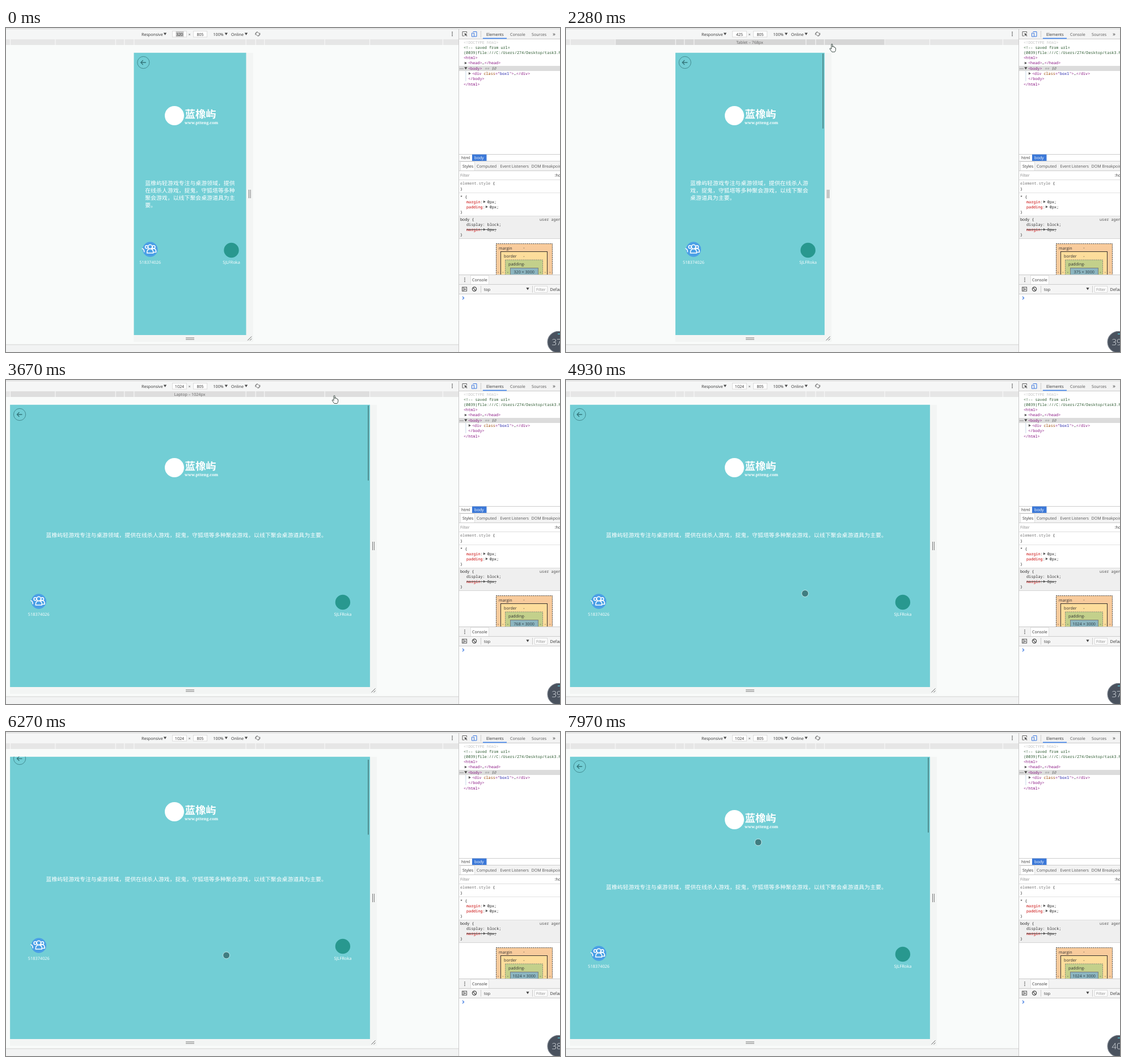
An HTML page that plays this animation: 977x573 px, repeating every 8000 ms.

```html
<!DOCTYPE html>
<html lang="zh-CN">
<head>
<meta charset="utf-8">
<title>Responsive preview</title>
<style>
html, body { margin: 0; width: 100%; height: 100%; overflow: hidden; background: #f9fbfa; }
svg { display: block; }
text { font: 7.15px "Open Sans", "Noto Sans", sans-serif; fill: #333; white-space: pre; text-rendering: geometricPrecision; }
.m { font: 6.82px "Noto Sans Mono", "DejaVu Sans Mono", monospace; }
.zh { font-family: "Noto Sans CJK SC", "Noto Sans CJK", sans-serif; }
</style>
</head>
<body>
<svg id="stage" width="977" height="573" viewBox="0 0 977 573"></svg>
<script>
const NS = 'http://www.w3.org/2000/svg';
const stage = document.getElementById('stage');
const LOOP = 8000, SCALE = 0.62, MID = 324.5, TOP = 44, BOTTOM = 543;

function el(tag, attrs, parent = stage) {
  const n = document.createElementNS(NS, tag);
  set(n, attrs);
  parent.appendChild(n);
  return n;
}
function set(n, attrs) { for (const k in attrs) n.setAttribute(k, attrs[k]); }
function rect(x, y, width, height, fill, parent, more) {
  return el('rect', { x, y, width, height, fill, ...more }, parent);
}
function path(d, stroke, parent, more) {
  return el('path', { d, stroke, fill: 'none', ...more }, parent);
}
function text(x, y, str, fill = '#333', parent, more) {
  const n = el('text', { x, y, style: 'fill:' + fill, ...more }, parent);
  n.textContent = str;
  return n;
}
function code(x, y, parts) {
  const n = el('text', { x, y, class: 'm' });
  for (let i = 0; i < parts.length; i += 2) {
    const s = el('tspan', { style: 'fill:' + parts[i + 1] }, n);
    s.textContent = parts[i];
  }
}
const down = (x, y, fill = '#444') => path(`M${x - 2.6} ${y - 2}h5.2l-2.6 4.4z`, 'none', stage, { fill });
const right = (x, y) => path(`M${x - 1.6} ${y - 2.3}v4.6l4-2.3z`, 'none', stage, { fill: '#555' });
const hline = (x, y, w, c = '#ccc') => rect(x, y, w, 1, c);
const dots = (x, y) => [-3, 0, 3].forEach(d => el('circle', { cx: x, cy: y + d, r: 0.9, fill: '#555' }));

// Device toolbar
rect(0, 0, 977, 573, '#f9fbfa');
rect(0, 0, 798, 20, '#f5f6f6');
hline(0, 1, 977, '#d0d0d0');
text(239, 13.6, 'Responsive');
down(280.5, 10.4);
rect(293.5, 5.5, 25, 10.5, '#fff', stage, { stroke: '#dcdcdc' });
const selection = rect(299.5, 6, 14, 9.5, '#c6c6c6');
const widthText = text(306, 13.6, '320', '#333', stage, { 'text-anchor': 'middle' });
text(321.5, 13.8, '×', '#555');
rect(330.5, 5.5, 24, 10.5, '#fff', stage, { stroke: '#dcdcdc' });
text(342.5, 13.6, '805', '#333', stage, { 'text-anchor': 'middle' });
text(365.5, 13.6, '100%');
down(388.3, 10.4);
text(397, 13.6, 'Online');
down(423.5, 10.4);
el('rect', { x: 441.3, y: 7.8, width: 5, height: 5.6, rx: 1, transform: 'rotate(-45 443.8 10.6)', fill: 'none', stroke: '#555', 'stroke-width': 0.8 });
path('M440.2 12.5a4 4 0 0 1 3-5.7M447.5 8.6a4 4 0 0 1-3 5.8', '#555', stage, { 'stroke-width': 0.8 });
dots(787, 10.5);

// Preset bars
const presets = [
  { name: 'Mobile S', px: 320, tone: '#d4d4d4', breaks: [16, 16, 16] },
  { name: 'Mobile M', px: 375, tone: '#d2d2d2', breaks: [18, 17] },
  { name: 'Mobile L', px: 425, tone: '#d4d4d4', breaks: [21, 21] },
  { name: 'Tablet', px: 768, tone: '#d6d6d6', breaks: [38] },
  { name: 'Laptop', px: 1024, tone: '#dedede', breaks: [] },
  { name: 'Laptop L', px: 1440, tone: '#dedede', breaks: [] }
];
rect(0, 20, 798, 10, '#e6e6e6');
const hoverBar = rect(0, 20, 0, 10, '#d2d2d2');
for (const p of presets) {
  const half = p.px * SCALE / 2;
  rect(MID - half, 20, 1, 10, '#fafafa');
  rect(MID + half - 1, 20, 1, 10, '#fafafa');
}
const label = text(MID - 0.5, 28.2, '', '#666', stage, { 'text-anchor': 'middle' });

// Resize handles
const handles = el('g', {});
const shadeSide = rect(0, TOP, 12, 511, '#f3f5f4', handles);
const shadeBase = rect(0, BOTTOM, 0, 12, '#f3f5f4', handles);
path('M317 548h15M317 550.8h15', '#777', handles);
const grips = el('g', {}, handles);
path('M4.6 286v15M7.4 286v15', '#777', grips);
path('M2.5 552.5l7-7M6.5 552.5l3-3', '#666', grips);

// Previewed page
const view = el('svg', { y: TOP - 0.4, height: BOTTOM - TOP + 0.4 });
const back = rect(0, 0, 977, 573, '#72ced5', view);
const page = el('g', {}, view);
const arrow = el('g', { transform: 'translate(17 61)' }, page);
el('circle', { r: 10.6, fill: 'none', stroke: '#3f858b', 'stroke-width': 0.9 }, arrow);
path('M4.5 0h-9M-0.6-4l-4 4 4 4', '#34757b', arrow, { 'stroke-width': 1.3 });

const logo = el('g', {}, page);
el('circle', { cx: -27.5, cy: 155, r: 17, fill: '#fff' }, logo);
text(-9, 159, '蓝橡屿', '#fff', logo, { class: 'zh', 'font-weight': 700, style: 'fill:#fff;font-size:18.4px;font-weight:700' });
text(-9.5, 170.2, 'www.ptteng.com', '#fff', logo, { style: 'fill:#fff;font:600 7px "Noto Serif",serif' });

const intro = '蓝橡屿轻游戏专注与桌游领域，提供在线杀人游戏，捉鬼，守狐塔等多种聚会游戏，以线下聚会桌游道具为主要。';
const rows = [0, 1, 2, 3].map(i =>
  text(0, 277.7 + i * 13, '', '#fff', page, { class: 'zh', style: 'fill:#fff;font-size:9.92px' }));

const group = el('g', {}, page);
el('circle', { cy: 391.5, r: 13.2, fill: '#4a9fe6' }, group);
const person = { fill: '#4a9fe6', 'stroke-width': 1.5, 'stroke-linejoin': 'round' };
for (const s of [-1, 1]) {
  path(`M${s * 10.5} 396.5q0-6-4-6.5h-${s < 0 ? -3 : 3}v6.5z`, '#fff', group, person);
  el('circle', { cx: s * 6.2, cy: 387.3, r: 2.5, stroke: '#fff', ...person }, group);
}
path('M-5.6 398q0-7.5 5.6-7.5t5.6 7.5z', '#fff', group, person);
el('circle', { cy: 386.8, r: 3.6, stroke: '#fff', ...person }, group);
const caption = { 'text-anchor': 'middle' };
text(0, 417, '518374026', '#fff', group, { ...caption, style: 'fill:#fff;font-size:7.4px' });

const account = el('g', {}, page);
el('circle', { cy: 393, r: 13.2, fill: '#28988f' }, account);
text(0, 417, 'SJLFRoka', '#fff', account, { ...caption, style: 'fill:#fff;font-size:7.4px' });
const thumb = rect(0, 0, 2, 133, '#4f8d8f', view, { rx: 1 });

// Developer panel
rect(0, 560, 798, 13, '#f2f3f3');
hline(0, 559.5, 798, '#d4d4d4');
rect(798, 2, 179, 571, '#fff');
rect(798, 2, 179, 17.5, '#f3f3f3');
hline(798, 19, 179);
path('M812.5 9V6.5h-7.5v7.5h3', '#555', stage, { 'stroke-width': 0.9 });
path('M808.5 9l5 2-2 .8 2 2.2-1 .8-1.9-2.2-1.2 1.8z', 'none', stage, { fill: '#555' });
path('M823.5 6.5h6.5v8.5h-4M821.5 9h4v6.2h-4z', '#3b78e0', stage, { 'stroke-width': 1 });
rect(837, 5, 1, 12, '#ccc');
text(847, 13.7, 'Elements');
rect(841, 17.5, 42, 1.7, '#4a8cf0');
text(889, 13.7, 'Console', '#555');
text(927, 13.7, 'Sources', '#555');
text(964, 13.5, '»', '#444', stage, { style: 'fill:#444;font-size:10px' });

const TAG = '#881280', ATTR = '#994500', VAL = '#1a1aa6', RED = '#c80000', INK = '#222', NOTE = '#2c5a30';
rect(798, 67, 179, 9, '#dcdcdc');
rect(810.5, 76, 0.8, 18, '#b9d2e4');
code(807, 27.6, ['<!DOCTYPE html>', '#c0c0c0']);
code(807, 37, ['<!-- saved from url=', NOTE]);
code(807, 46.2, ['(0039)file:///C:/Users/274/Desktop/task3.html', NOTE]);
code(807, 55.2, ['<html>', TAG]);
code(815, 64.4, ['<head>', TAG, '…', INK, '</head>', TAG]);
code(815, 73.7, ['<body>', TAG]);
text(844, 73.7, '== $0', '#777', stage, { class: 'm', 'font-style': 'italic', style: 'fill:#777;font-style:italic' });
code(822, 82.9, ['<div', TAG, ' class', ATTR, '="', TAG, 'box1', VAL, '">', TAG, '…', INK, '</div>', TAG]);
code(815, 92.3, ['</body>', TAG]);
code(807, 101.5, ['</html>', TAG]);
right(810.5, 62);
down(810.8, 71.2);
right(817.5, 80.4);
[801, 803.4, 805.8].forEach(cx => el('circle', { cx, cy: 72, r: 0.8, fill: '#777' }));

hline(798, 223, 179);
text(803, 232.4, 'html');
rect(822, 223.6, 25.5, 12, '#3b78d8');
text(826, 232.4, 'body', '#fff');
rect(798, 235.5, 179, 17, '#f3f3f3');
hline(798, 235, 179);
rect(801.5, 236.5, 25, 16, '#fff', stage, { stroke: '#d6d6d6', 'stroke-width': 0.7 });
hline(798, 252, 179);
text(805, 247.3, 'Styles');
text(830, 247.3, 'Computed', '#555');
text(871.5, 247.3, 'Event Listeners', '#555');
text(926.5, 247.3, 'DOM Breakpoints', '#555');
text(801, 263.3, 'Filter', '#888');
text(967.5, 263.3, ':hov', '#333');
hline(798, 268, 179, '#ddd');
code(801, 276.8, ['element.style ', '#777', '{', INK]);
code(801, 287.3, ['}', INK]);
hline(798, 291, 179, '#e2e2e2');
code(801, 300.5, ['* {', INK]);
code(812, 309.6, ['margin', RED, ':', INK]);
right(843.5, 307.2);
code(848.8, 309.6, ['0px;', INK]);
code(812, 318.7, ['padding', RED, ':', INK]);
right(847.5, 316.3);
code(852.8, 318.7, ['0px;', INK]);
code(801, 327.6, ['}', INK]);
rect(798, 332, 179, 40, '#efefef');
hline(798, 332, 179, '#ddd');
code(801, 340.5, ['body {', INK]);
code(941, 340.5, ['user agent stylesheet', '#555']);
code(812, 350, ['display: block;', '#333']);
code(812, 358.9, ['margin', RED, ':', INK]);
right(843.5, 356.4);
code(848.8, 358.9, ['8px;', INK]);
hline(812, 356, 53, '#555');
code(801, 367.8, ['}', INK]);
hline(798, 372, 179, '#d4d4d4');

// Box model
const box = (x, y, w, fill, stroke, dash) => rect(x, y, w, 80, fill, stage, { stroke, 'stroke-width': 0.9, 'stroke-dasharray': dash });
box(864.5, 381.5, 99, '#f8cb9c', '#222', '2 1.4');
box(872.5, 395.5, 82, '#fddd9b', '#222', 'none');
box(880.5, 410, 66, '#c3d08b', '#777', '2 1.4');
box(889.5, 424.5, 49, '#8cb5c0', '#777', 'none');
text(869, 391.6, 'margin');
text(878, 405.8, 'border');
text(886, 420, 'padding');
[[913.5, 391.2], [913.5, 405.5], [914, 419.6]].forEach(p => text(...p, '-', INK, stage, caption));
[868, 876.5, 885, 942.5, 951, 959.5].forEach(x => text(x, 434, '-', INK, stage, caption));
const boxText = text(913.7, 434.4, '', '#2d3d44', stage, caption);

// Console drawer
rect(798, 436.5, 179, 17, '#f3f3f3');
hline(798, 436, 179);
dots(809, 445.3);
rect(819.5, 437.5, 32, 16, '#fff', stage, { stroke: '#d6d6d6', 'stroke-width': 0.7 });
text(822, 448.3, 'Console');
rect(798, 453.5, 179, 17, '#f5f5f5');
hline(798, 453, 179);
rect(798, 470.5, 179, 103, '#fff');
hline(798, 470, 179);
rect(804.5, 458.3, 8, 7, 'none', stage, { stroke: '#555' });
path('M806.8 458v7.5', '#555');
path('M808.4 460v3.8l3-1.9z', 'none', stage, { fill: '#555' });
el('circle', { cx: 826, cy: 461.8, r: 3.6, fill: 'none', stroke: '#444', 'stroke-width': 1.2 });
path('M823.5 459.3l5 5', '#444', stage, { 'stroke-width': 1.2 });
rect(837, 456, 1, 12, '#ccc');
text(843, 464.7, 'top');
down(920, 461.2);
rect(928, 456, 1, 12, '#ccc');
rect(932.5, 456.5, 22, 11, '#fff', stage, { stroke: '#dadada' });
text(935, 464.7, 'Filter', '#888');
text(959.5, 464.7, 'Default levels');
path('M805 475l2.6 2.5-2.6 2.5', '#3b78e0', stage, { 'stroke-width': 1.2 });
rect(798, 2, 1, 571, '#c8c8c8');

// Load badge
el('circle', { cx: 974, cy: 555.5, r: 19, fill: '#4a525e', stroke: '#868d96', 'stroke-width': 1.2 });
path('M973 541.2q3-.5 6 .4', '#58c4d6', stage, { 'stroke-width': 1.4 });
const badge = text(962.5, 561, '', '#e8ecef', stage, { style: 'fill:#e8ecef;font-size:15px;font-weight:300' });

// Pointers
const touch = el('g', {});
el('circle', { r: 6, fill: '#3f7d81', stroke: '#c4e8ea', 'stroke-width': 1 }, touch);
const hand = path('M-1 1.2q1-2 2 0v4.6l.2-1.2q1.3-.7 1.9.3v.8q1.4-.6 1.8.5v.8q1.5-.4 1.7.7v3.2q-.3 2.2-1.6 3.6h-5q-2.2-2.6-3.8-5.4 0-1.4 1.4-1l1.4 1.3z', '#2b3b35', stage, { fill: '#fff', 'stroke-width': 0.9 });
const pointer = path('M0 0v10.5l2.5-2.3 1.7 3.8 1.6-.7-1.6-3.7h3.3z', '#222', stage, { fill: '#fff', 'stroke-width': 0.8 });

// Timeline
const cursorKeys = [
  [110, 390, 300], [390, 408, 203], [550, 410, 200], [900, 425, 50], [1200, 425.5, 27],
  [1500, 425.5, 27], [1900, 447, 27], [2150, 447, 27], [2400, 488, 28.5], [2590, 489, 29.5],
  [2700, 489, 29.5], [3250, 579, 27], [3700, 579, 27], [4200, 520, 160], [4470, 480, 260],
  [5170, 400, 421], [5330, 398, 421], [5630, 398, 407], [5950, 394, 350], [6350, 388, 400],
  [6700, 365, 10], [6950, 360, 14], [7050, 358, 38], [7210, 341, 254], [7250, 341, 254],
  [7600, 338, 170], [7970, 339, 195]
];
const scrollKeys = [[0, 0], [5330, 0], [5630, 14], [5950, 70], [6400, 0], [7250, 0], [7600, 60], [7960, 0]];
const sizeSteps = [[0, 0], [1400, 1], [2030, 2], [2590, 3], [3580, 4]];
const badgeSteps = [[0, 37], [350, 38], [1250, 39], [2400, 40], [3440, 39], [4480, 37], [5520, 38], [6560, 39], [7600, 40]];
const barSpans = [[1400, 1400], [2030, 2030], [2590, 2590], [3580, 3580], [5330, 6400], [7270, LOOP]];
const BOX_LAG = 550;

function step(list, t) {
  let v = list[0][1];
  for (const [at, next] of list) if (t >= at) v = next;
  return v;
}
function ease(keys, t, i) {
  if (t <= keys[0][0]) return keys[0][i];
  for (let k = 1; k < keys.length; k++) {
    const a = keys[k - 1], b = keys[k];
    if (t <= b[0]) {
      const u = (t - a[0]) / (b[0] - a[0]);
      return a[i] + (b[i] - a[i]) * u * u * (3 - 2 * u);
    }
  }
  return keys[keys.length - 1][i];
}
const put = (n, x, y) => n.setAttribute('transform', `translate(${x} ${y})`);
const show = (n, on) => n.setAttribute('visibility', on ? 'visible' : 'hidden');

function layout(preset, w) {
  const left = MID - w / 2, end = left + w;
  set(view, { x: left, width: w });
  set(back, { width: w });
  set(shadeSide, { x: end });
  set(shadeBase, { x: left, width: w + 12 });
  put(grips, end, 0);
  put(logo, w / 2, 0);
  put(group, w * 0.05 + 19, 0);
  put(account, w * 0.95 - 16.3, 0);
  set(thumb, { x: w - 4 });
  let from = 0;
  rows.forEach((row, i) => {
    const to = from + (i < preset.breaks.length ? preset.breaks[i] : intro.length);
    row.textContent = intro.slice(from, to);
    row.setAttribute('x', w * 0.1);
    from = to;
  });
}

let current = -1;
function draw(t) {
  const size = step(sizeSteps, t), preset = presets[size], w = preset.px * SCALE;
  if (size !== current) layout(preset, w);
  current = size;
  widthText.textContent = preset.px;
  show(selection, size === 0);
  boxText.textContent = presets[t < BOX_LAG ? 0 : step(sizeSteps, t - BOX_LAG)].px + ' × 3000';
  badge.textContent = step(badgeSteps, t);

  const scroll = ease(scrollKeys, t, 1);
  put(page, 0, 0.4 - TOP - scroll);
  let alpha = 0;
  for (const [a, b] of barSpans)
    if (t >= a) alpha = Math.max(alpha, Math.min(1, 1 - (t - b - 550) / 150));
  set(thumb, { y: 1.4 + scroll * 0.268, opacity: Math.max(0, alpha) });

  const x = ease(cursorKeys, t, 1), y = ease(cursorKeys, t, 2), on = t >= 110;
  const onBar = on && y >= 20 && y <= 31;
  const inPage = y > TOP && y < BOTTOM && Math.abs(x - MID) < w / 2;
  const hit = onBar && presets.find(p => Math.abs(x - MID) < p.px * SCALE / 2);
  show(hoverBar, hit);
  show(label, hit);
  if (hit) {
    const hw = hit.px * SCALE;
    set(hoverBar, { x: MID - hw / 2, width: hw, fill: hit.tone });
    label.textContent = `${hit.name} – ${hit.px}px`;
  }
  show(touch, on && inPage);
  show(hand, onBar);
  show(pointer, on && !inPage && !onBar);
  [touch, hand, pointer].forEach(n => put(n, x, y));
}

const start = performance.now();
function tick() {
  draw((performance.now() - start) % LOOP);
  requestAnimationFrame(tick);
}
tick();
</script>
</body>
</html>
```
